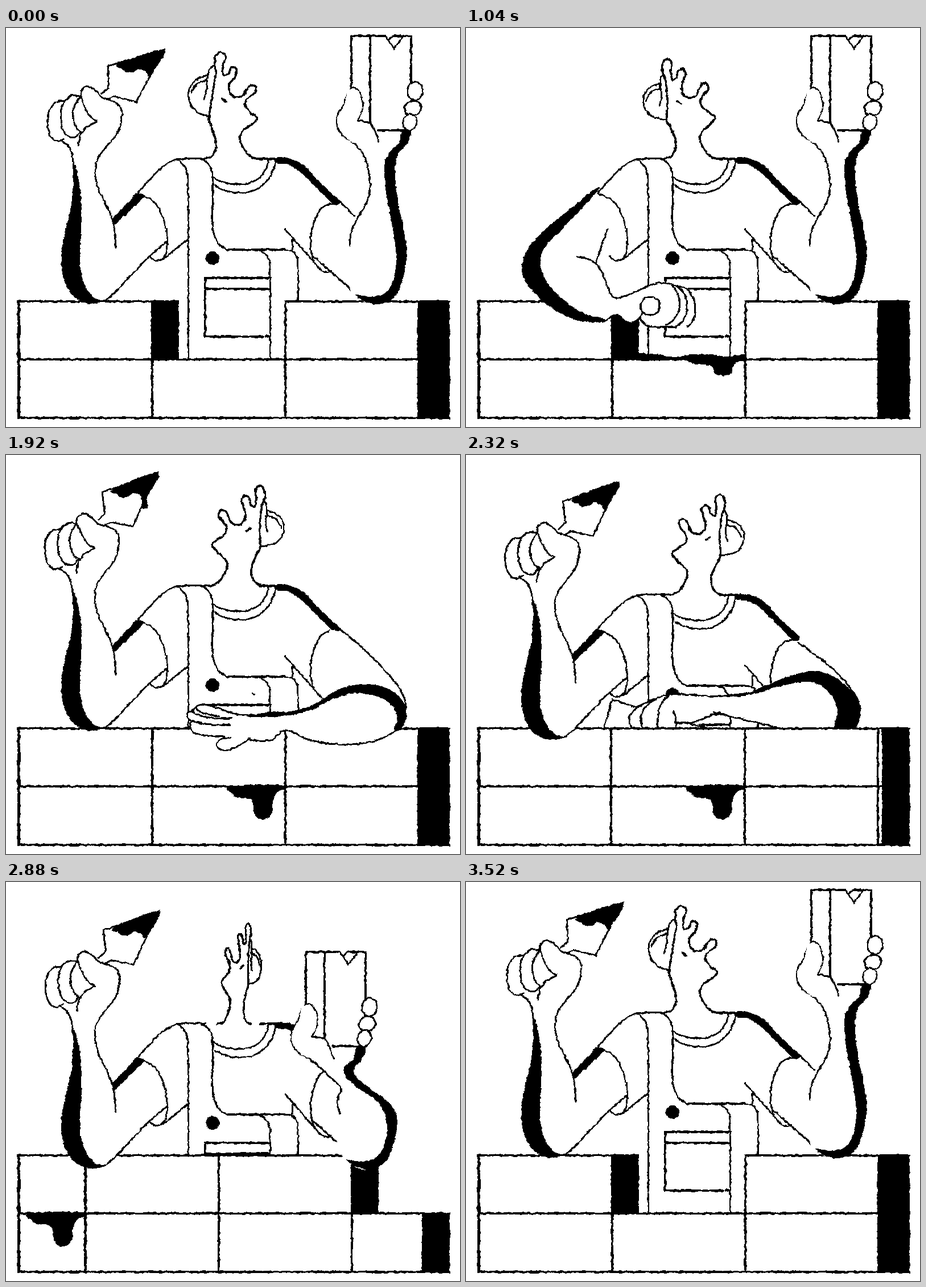
An HTML page with a canvas that plays this animation: 798 by 702 pixels, repeating every 3.6 s.

```html
<!DOCTYPE html>
<html lang="en">
<head>
<meta charset="utf-8">
<title>Bricklayer</title>
<style>
html, body { margin: 0; width: 798px; height: 702px; overflow: hidden; background: #fff; }
canvas { display: block; filter: url(#rough); }
svg { position: absolute; width: 0; height: 0; }
</style>
</head>
<body>
<svg><filter id="rough" x="0" y="0" width="1" height="1" color-interpolation-filters="sRGB">
  <feTurbulence type="fractalNoise" baseFrequency="0.14" numOctaves="2" seed="4" result="noise"/>
  <feDisplacementMap in="SourceGraphic" in2="noise" scale="4.5" xChannelSelector="R" yChannelSelector="G"/>
  <feComponentTransfer>
    <feFuncR type="discrete" tableValues="0 1"/>
    <feFuncG type="discrete" tableValues="0 1"/>
    <feFuncB type="discrete" tableValues="0 1"/>
  </feComponentTransfer>
</filter></svg>
<canvas id="stage" width="798" height="702"></canvas>
<script>
const ctx = document.getElementById('stage').getContext('2d');
const LOOP = 3600, STEP = 80;
const LEFT = 22.5, BRICK = 234.3, TOP = 481, MID = 583, BASE = 686;
const same = p => p;
let warp = same;

const smooth = (x, a = 0, b = 1) => {
  const k = Math.min(1, Math.max(0, (x - a) / (b - a)));
  return k * k * (3 - 2 * k);
};
const points = s => s.split(' ').map(p => p.split(',').map(Number));
const mix = (a, b, k) => a.map((p, i) => [p[0] + (b[i][0] - p[0]) * k, p[1] + (b[i][1] - p[1]) * k]);

function key(t, frames) {
  let i = 0;
  while (i < frames.length - 1 && frames[i + 1][0] <= t) i++;
  const a = frames[i], b = frames[i + 1];
  if (!b || t <= a[0]) return a[1];
  return a[1] + (b[1] - a[1]) * smooth(t, a[0], b[0]);
}

function rotate([x, y], cx, cy, degrees) {
  const r = degrees * Math.PI / 180, c = Math.cos(r), s = Math.sin(r);
  return [cx + (x - cx) * c - (y - cy) * s, cy + (x - cx) * s + (y - cy) * c];
}

// Smooth curve through the points, or straight segments.
function trace(shape, closed, sharp) {
  const p = (typeof shape === 'string' ? points(shape) : shape).map(q => warp(q));
  const n = p.length;
  const at = i => closed ? p[(i + n) % n] : p[Math.max(0, Math.min(n - 1, i))];
  ctx.beginPath();
  ctx.moveTo(...p[0]);
  for (let i = 0; i < (closed ? n : n - 1); i++) {
    const a = at(i - 1), b = at(i), c = at(i + 1), d = at(i + 2);
    if (sharp) ctx.lineTo(...c);
    else ctx.bezierCurveTo(b[0] + (c[0] - a[0]) / 6, b[1] + (c[1] - a[1]) / 6,
      c[0] - (d[0] - b[0]) / 6, c[1] - (d[1] - b[1]) / 6, ...c);
  }
}
function fill(color) { ctx.fillStyle = color; ctx.fill(); }
function stroke(width) { ctx.lineWidth = width; ctx.stroke(); }
function line(shape, width = 3) { trace(shape); stroke(width); }
function straight(shape, width = 3) { trace(shape, false, true); stroke(width); }
function patch(shape, sharp) { trace(shape, true, sharp); fill('#fff'); }
function blob(shape, sharp) { trace(shape, true, sharp); fill('#000'); }
function form(shape, width = 3) { trace(shape); fill('#fff'); stroke(width); }
function oval(x, y, rx, ry, turn = 0) {
  const [cx, cy] = warp([x, y]);
  ctx.beginPath();
  ctx.ellipse(cx, cy, rx, ry, turn, 0, 7);
  fill('#fff');
  stroke(3);
}
function dot(x, y, r) {
  const [cx, cy] = warp([x, y]);
  ctx.beginPath();
  ctx.arc(cx, cy, r, 0, 7);
  fill('#000');
}

const FACE = points('345,231 360,226 368,212 368,195 358,172 353,160 354,125 352,100 350,88 345,75 346,61 353,54 361,60 360,78 363,91 370,87 373,75 381,72 386,81 380,100 380,114 390,123 404,119 410,106 415,98 423,98 426,108 416,120 412,131 418,142 437,155 433,166 420,178 411,190 414,205 424,221 436,229 452,231');
const FACE_UP = points('345,231 361,226 369,211 368,195 360,172 357,157 362,122 367,92 369,76 367,62 368,50 377,42 386,50 381,68 382,82 391,80 396,70 405,72 403,86 393,98 393,112 402,121 417,119 423,108 430,101 439,104 437,114 426,123 420,133 427,146 441,157 436,167 421,177 411,190 414,205 424,221 436,229 452,231');

function head(tilt, facing) {
  const pose = (a, b) => mix(points(a), points(b), tilt);
  ctx.save();
  warp = ([x, y]) => [400 + (x - 400) * facing, y];
  form(pose('345,97 326,103 313,118 313,138 326,155 352,161', '357,82 336,90 322,108 323,130 336,148 357,156'));
  line(pose('340,107 325,113 316,128', '352,92 335,99 326,113'));
  form(pose('340,136 344,118 341,100 344,84 350,82', '348,125 353,108 354,88 359,71 367,67'));
  const outline = mix(FACE, FACE_UP, tilt);
  patch(outline);
  line(outline, 3.6);
  line(pose('371,129 378,133', '380,124 387,130'), 3.6);
  warp = same;
  ctx.restore();
}

function torso() {
  line('224,298 245,275 270,249 290,235 308,230 352,230');
  line('300,231 312,240 319,258 320,290 320,583');
  line('343,230 357,241 363,262 363,340 366,364 376,382 390,390');
  line('363,262 378,270 405,275 430,272 447,262 458,245 461,231');
  line('367,277 385,286 410,290 438,285 460,267 471,247 474,231');
  straight('445,230 478,230');
  blob('476,228 500,230 525,243 555,275 586,304 576,310 545,280 520,256 500,242 476,238');
  // sleeves
  line('228,292 244,296 262,308 276,333 283,368 281,395 273,407 262,409 252,402');
  straight('276,407 320,371');
  line('582,308 562,312 547,328 537,360 536,390 541,410 552,425 562,430 572,427');
  straight('490,354 507,373 548,420');
  straight('504,372 503,390');
  // bib
  straight('388,390 490,390');
  line('490,390 504,393 511,404 513,425 513,583');
  line('438,390 454,396 463,411 464,435 464,583');
  straight('464,440 350,440 350,543 451,543', 3.4);
  straight('350,459 464,459', 3.4);
  straight('456,542 464,542');
  dot(363, 405, 12);
}

function box(x, y, w, h, width = 4) {
  ctx.beginPath();
  ctx.rect(x, y, w, h);
  fill('#fff');
  stroke(width);
}

function wall(t, shift) {
  const placed = t >= 1760;
  ctx.save();
  ctx.beginPath();
  ctx.rect(20, 0, 761, 702);
  ctx.clip();
  for (let k = 0; k < 7; k++) {
    const x = LEFT + BRICK * k - shift;
    box(x, MID, BRICK, BASE - MID);
    if (k === 4 || k === 1 && !placed) {
      ctx.fillStyle = '#000';
      ctx.fillRect(x - 1, TOP - 2, 48, MID - TOP + 2);
    } else {
      const lift = k === 1 ? key(t, [[1760, 45], [1840, 0]]) : 0;
      box(x, TOP - lift, BRICK, MID - TOP);
    }
  }
  mortar(t, shift, placed);
  const end = shift > 0 && t < 3480 ? 731 : 725;
  const gapAtEnd = Math.floor((755 + shift - LEFT) / BRICK) === 4;
  ctx.fillStyle = '#000';
  ctx.fillRect(end, gapAtEnd ? MID : TOP - 2, 780 - end, 210);
  ctx.fillRect(end, BASE - 10, 780 - end, 12);
  ctx.fillStyle = '#fff';
  ctx.fillRect(0, BASE + 2, 798, 14);
  ctx.restore();
  straight('22.5,481 22.5,686', 4);
}

function mortar(t, shift, placed) {
  if (t < 600) return;
  ctx.save();
  ctx.translate(-shift, 0);
  if (!placed) {
    const from = key(t, [[640, 480], [960, 300]]);
    ctx.save();
    ctx.beginPath();
    ctx.rect(from, 560, 492 - from, 30);
    ctx.clip();
    blob('300,573 335,574 365,579 400,574 430,574 460,578 491,574 492,585 400,584 300,585');
    ctx.restore();
  }
  const drop = key(t, [[800, 0], [1280, 1]]);
  if (drop > 0) {
    warp = ([x, y]) => [x, 582 + (y - 582) * drop];
    blob('394,582 397,596 408,602 426,604 434,613 436,630 444,640 458,640 467,630 469,611 474,597 482,590 490,588 491,581');
    warp = same;
  }
  ctx.restore();
}

function trowel(dripping) {
  patch('167,117 181,105 179,67 278,38 229,130 190,120 180,126', true);
  straight('167,117 181,105 179,67 278,38 229,130 190,120 178,127');
  blob('278,38 253,83 245,76 233,72 225,77 213,78 205,73 198,63', false);
  blob('198,63 278,38 253,82 235,66', true);
  if (dripping) {
    straight('251,78 252,92', 8);
    dot(252, 95, 6);
  }
}

function leftArmUp(angle, dripping) {
  const bend = p => rotate(p, 140, 275, angle * (1 - smooth(p[1], 230, 340)));
  warp = p => bend(rotate(p, 170, 118, angle * 0.3));
  trowel(dripping);
  warp = bend;
  patch('112,212 118,240 115,300 98,400 105,450 135,480 155,484 175,479 215,440 248,404 270,380 260,325 238,298 190,346 170,305 158,262 160,232 190,200');
  line('158,483 176,478 195,462 215,440 250,404 283,375');
  blob('188,334 190,348 244,297 230,291', true);
  blob('117,230 118,262 115,310 105,355 97,400 101,440 115,468 138,483 155,485 172,481 155,474 140,455 131,425 130,390 133,350 132,300 126,258');
  patch('130,120 145,104 185,130 204,155 196,185 160,232 119,240 105,200 118,150');
  form('103,129 88,130 76,145 73,168 78,190 90,199 103,195');
  form('129,120 115,119 101,132 96,155 100,180 110,191 122,192 130,184');
  form('130,122 119,140 118,160 125,178 136,184');
  patch('132,116 135,107 145,103 157,110 170,124 190,131 203,148 198,175 165,195 136,185 150,162 138,140');
  line('160,164 152,160 143,148 135,130 131,115 135,107 145,103 157,110 170,123 185,128 200,138 204,155 196,185 176,209 161,231 157,256 163,285 178,315 189,345 193,386');
  line('160,165 141,175 131,189 127,207');
  line('96,197 109,207 116,222 119,245');
  warp = same;
}

function leftArmDown(hx, hy, scraping) {
  warp = ([x, y]) => {
    const w = smooth(x, 200, 390);
    return [x + hx * w, y + hy * w];
  };
  if (scraping) blob('476,345 481,355 487,384 483,391 469,391 467,384 471,357', true);
  patch('238,296 215,300 160,340 110,385 98,420 108,450 140,485 190,512 262,530 310,540 340,552 360,568 375,573 396,560 404,576 430,582 470,581 488,560 485,530 468,512 432,503 410,507 385,518 355,522 325,515 300,497 265,452 240,420 272,380 260,320');
  straight('237,418 283,375');
  blob('244,293 225,289 190,313 150,345 113,382 98,420 107,450 140,485 190,513 262,532 262,524 210,504 168,475 140,443 131,412 139,385 170,353');
  line('195,403 215,407 240,423 265,452 298,495 325,515 355,522 385,518 410,507 432,503 450,507 472,514 483,527 488,548 484,570 474,581');
  line('262,532 310,540 340,552 360,568 375,573 388,568 396,556');
  line('447,507 458,525 460,548 449,569 436,578');
  line('455,509 469,523 474,545 467,569 455,580');
  line('390,564 399,576 420,581 455,581');
  oval(409, 544, 17, 16);
  warp = same;
}

function rightArmUp(hx, hy) {
  straight('584,303 613,331');
  straight('538,400 570,428 622,474');
  warp = ([x, y]) => {
    const w = 1 - smooth(y, 190, 410);
    return [x + hx * (0.2 + 0.8 * w), y + hy * w];
  };
  patch('607,14 712,14 712,180 607,180', true);
  patch('618,163 592,190 628,222 640,280 618,335 606,368 597,440 620,474 650,486 695,450 702,400 688,300 684,250 702,202 708,182 655,180');
  blob('712,181 706,202 690,222 684,250 688,300 700,360 704,400 696,448 680,476 655,486 632,482 614,469 640,473 662,468 678,450 686,410 681,360 668,290 665,245 672,222 690,202 697,181');
  straight('607,110 607,14 667,14 682,36 699,14');
  straight('672,23 680,14 712,14 712,100');
  straight('640,14 640,166');
  straight('654,180 712,180');
  line('605,384 606,362 617,336 634,307 640,280 637,250 628,222 612,203 592,189 582,172 583,153 594,134 600,115 610,106 620,111 627,130 625,148 618,162');
  patch('600,112 610,107 620,112 626,130 624,150 618,162 640,168 630,200 612,202 593,188 583,170 584,153 595,134');
  line('618,163 639,167 649,182 655,202');
  oval(719, 111, 13.5, 16, 0.15);
  oval(715, 141, 14.5, 13, -0.3);
  oval(710, 166, 12, 14.5, 0.25);
  warp = same;
}

function reachWarp(hx, hy) {
  warp = ([x, y]) => {
    const w = 1 - smooth(x, 440, 640);
    return [x + hx * w, y + hy * w];
  };
}

function rightArmPlace(hx, hy) {
  reachWarp(hx, hy);
  patch('584,310 640,356 688,405 703,440 690,484 660,500 620,508 570,508 530,500 505,488 490,485 470,500 445,503 400,498 345,492 323,470 340,440 380,448 440,457 500,455 545,440 562,426 542,395 545,345 562,315');
  line('584,304 625,338 665,378 690,408 702,435 700,470 686,484');
  blob('425,460 465,452 500,451 540,440 575,417 605,406 640,403 670,411 691,425 703,445 701,467 692,484 682,482 687,465 680,443 660,428 630,420 600,421 565,434 540,447 500,458 465,460');
  line('688,483 660,499 620,508 570,508 530,500 505,488 490,484 478,492 468,501 445,503 425,499');
  form('428,499 415,508 395,518 380,519 371,512 375,501 395,497');
  form('325,470 324,482 332,489 355,494 385,495');
  form('395,475 360,474 330,469 319,462 320,453 330,451');
  form('397,463 365,463 337,457 328,450 333,444');
  line('440,458 410,457 380,448 350,439 337,441 335,448 350,455 375,460');
  warp = same;
}

function rightArmReach(hx, hy) {
  ctx.save();
  ctx.translate(0, -19);
  reachWarp(hx, hy);
  patch('266,388 453,443 442,500 232,500', true);
  straight('312,403 266,388 234,500');
  straight('380,426 453,443 440,500');
  patch('586,328 640,376 685,425 692,450 684,500 570,500 550,465 520,445 480,425 450,411 410,428 378,430 350,470 300,425 325,395 370,380 450,383 500,388 538,385 548,350');
  line('586,325 640,375 668,404 688,432 693,455 685,481');
  blob('455,384 500,387 550,381 600,379 632,386 660,402 685,428 693,452 682,486 648,486 653,455 645,430 625,409 600,397 560,393 500,391');
  line('445,410 480,424 520,445 550,464 578,484');
  form('325,394 308,404 296,420 298,432 308,453 319,469 327,465 322,448 325,410');
  form('348,385 328,397 317,415 318,435 329,462 341,480 350,478 353,462');
  form('364,382 352,396 346,420 347,450 355,468 366,466 375,450 378,430 374,408');
  line('325,394 345,385 372,379 410,380 450,383 505,388');
  line('378,429 410,428 430,420 455,411');
  warp = same;
  ctx.restore();
}

function rightArm(t) {
  if (t >= 1760 && t < 2240) {
    rightArmPlace(key(t, [[1760, 50], [1840, 0]]), key(t, [[1760, -45], [1840, 0], [2080, 0], [2240, -25]]));
  } else if (t >= 2240 && t < 2800) {
    rightArmReach(key(t, [[2240, -10], [2640, 0], [2800, 30]]), key(t, [[2240, 10], [2400, 80], [2640, 0], [2800, -60]]));
  } else {
    rightArmUp(
      key(t, [[1280, 0], [1440, -39], [1600, -110], [1760, -170], [2800, -130], [2960, -30], [3200, -10], [3440, 0]]),
      key(t, [[1360, 0], [1440, -1], [1600, 50], [1760, 180], [2800, 190], [2960, -10], [3040, -25], [3200, 0]]));
  }
}

function leftArm(t) {
  if (t >= 440 && t < 1120) {
    leftArmDown(
      key(t, [[440, -70], [640, 0], [960, -110], [1120, -60]]),
      key(t, [[440, -130], [640, 0], [960, 0], [1120, -110]]), t >= 600 && t < 960);
  } else {
    const angle = key(t, [[0, 0], [160, -3], [440, 26], [1120, 26], [1440, 13], [1840, -2.5], [2640, -2], [2880, -2], [3200, -10], [3520, -0.5], [3600, 0]]);
    leftArmUp(angle, t >= 1840 && t < 2080);
  }
}

function draw(t) {
  const shift = 3 * BRICK * smooth(t, 2290, 3470);
  const sink = key(t, [[2080, 0], [2400, 19], [3200, 19], [3440, 0]]);
  const tilt = key(t, [[0, 1], [480, 0], [3200, 0], [3440, 1.08], [3600, 1]]);
  const turn = key(t, [[1600, 1], [1840, -1], [2800, -1], [3040, 1]]);
  const facing = Math.sign(turn || 1) * Math.max(0.55, Math.abs(turn));
  const behind = t >= 2240 && t < 2800;
  const sunk = part => {
    ctx.save();
    ctx.translate(0, sink);
    part();
    ctx.restore();
  };
  ctx.fillStyle = '#fff';
  ctx.fillRect(0, 0, 798, 702);
  ctx.strokeStyle = '#000';
  ctx.lineCap = 'round';
  ctx.lineJoin = 'miter';
  sunk(() => {
    head(tilt, facing);
    torso();
    if (behind) rightArm(t);
  });
  if (t >= 1840 && t < 2000) straight('433,419 437,422');
  if (t >= 2560 && t < 2720) dot(223, 478, 5);
  wall(t, shift);
  sunk(() => {
    if (!behind) rightArm(t);
    leftArm(t);
  });
}

let shown = -1;
function tick() {
  const frame = Math.floor((performance.now() % LOOP) / STEP);
  if (frame !== shown) draw((shown = frame) * STEP);
  requestAnimationFrame(tick);
}
tick();
</script>
</body>
</html>
```
